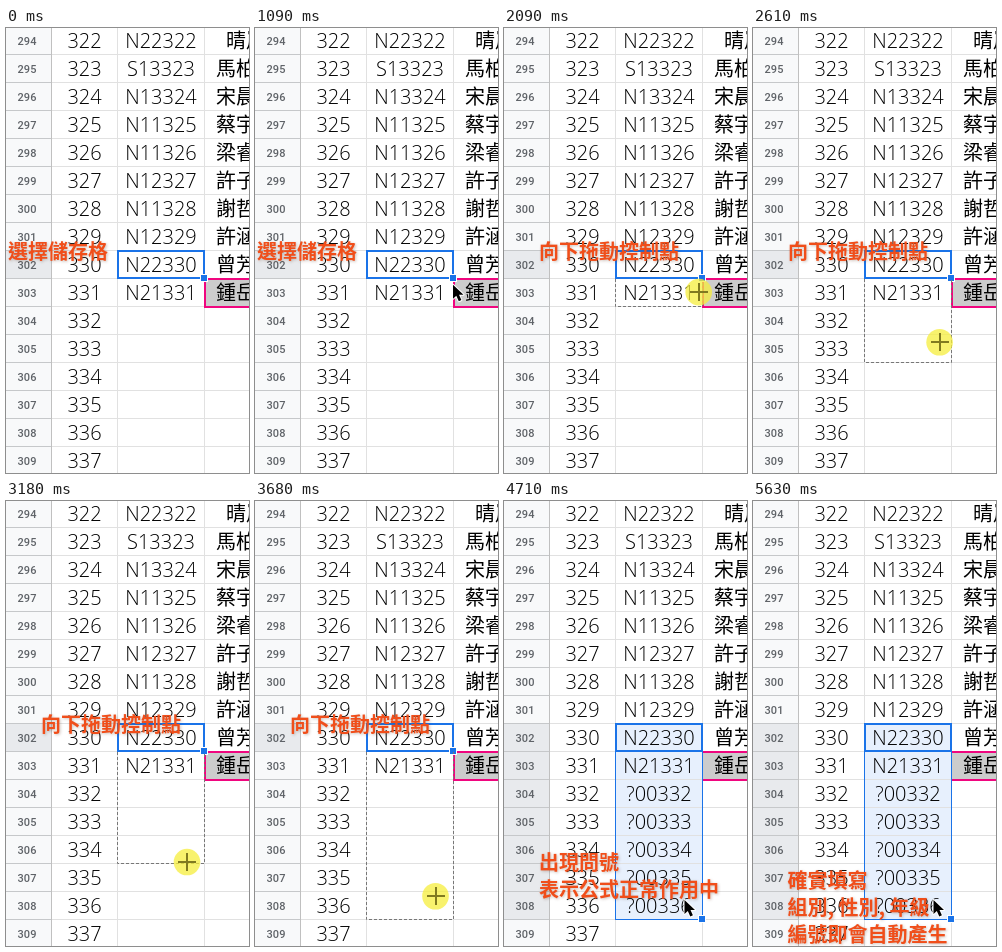
These frames come from a looping animation (243 by 445 pixels, 7.24 s). An HTML page with a canvas:

```html
<!DOCTYPE html>
<html lang="zh-Hant">
<head>
<meta charset="utf-8">
<style>
  html, body { margin: 0; width: 100%; height: 100%; overflow: hidden; background: #fff; }
  canvas { display: block; }
</style>
</head>
<body>
<canvas id="stage" width="243" height="445"></canvas>
<script>
const ctx = document.getElementById('stage').getContext('2d');
const LOOP = 7240, ROW = 28, FIRST_LINE = 26;
const LEFT = 111, RIGHT = 198, ACTIVE = 8, LAST = 14;
const BLUE = '#1a73e8', PINK = '#f0067f', INK = '#000';
const CJK = '"Noto Sans CJK TC", "Noto Sans CJK", sans-serif';
const CELL_FONT = '300 20px "Open Sans", "Noto Sans", sans-serif';
const NAME_FONT = '300 20px ' + CJK;
const LABEL_FONT = 'bold 20px ' + CJK;

const prefixes = ['N22', 'S13', 'N13', 'N11', 'N11', 'N12', 'N11', 'N12', 'N22', 'N21'];
const names = ['晴嵐', '馬柏安', '宋晨安', '蔡宇安', '梁睿安', '許子安', '謝哲安', '許涵安', '曾芳安', '鍾岳安'];

const labels = [
  { from: 0, to: 1210, x: 2, y: 223, lines: ['選擇儲存格'] },
  { from: 1710, to: 4190, x: 35, y: 223, lines: ['向下拖動控制點'] },
  { from: 4710, to: 5630, x: 35, y: 361, lines: ['出現問號', '表示公式正常作用中'] },
  { from: 5630, to: LOOP, x: 34.5, y: 379, lines: ['確實填寫', '組別, 性別, 年級', '編號即會自動產生'] }
];

// Pointer path: time, x, y
const path = [
  [500, 239, 286], [800, 212, 267], [1090, 198, 257], [1210, 198, 251], [1710, 198, 251],
  [2090, 195, 262.5], [2420, 189, 297], [2800, 184, 333], [3180, 181, 361],
  [3680, 180.5, 395], [3890, 180.5, 399]
];
const bursts = [[500, 1210], [1710, 2420], [2470, 3180], [3230, 3890]];

const lineY = row => FIRST_LINE + ROW * row;

function rect(x, y, w, h, color) {
  ctx.fillStyle = color;
  ctx.fillRect(x, y, w, h);
}

function frame(x, y, right, bottom, width, color) {
  rect(x, y, right - x + 1, width, color);
  rect(x, bottom - width + 1, right - x + 1, width, color);
  rect(x, y, width, bottom - y + 1, color);
  rect(right - width + 1, y, width, bottom - y + 1, color);
}

function text(value, x, y, font, color, align = 'center') {
  ctx.font = font;
  ctx.fillStyle = color;
  ctx.textAlign = align;
  ctx.fillText(value, x, y);
}

// The pointer moves at about 15 updates per second.
function pointerAt(time) {
  const burst = bursts.find(([a, b]) => time >= a && time < b);
  const t = burst ? burst[0] + Math.round((time - burst[0]) / 66) * 66 : time;
  let i = 1;
  while (i < path.length - 1 && path[i][0] < t) i++;
  const [t0, x0, y0] = path[i - 1], [t1, x1, y1] = path[i];
  const k = Math.min(1, Math.max(0, (t - t0) / (t1 - t0)));
  return { x: x0 + (x1 - x0) * k, y: y0 + (y1 - y0) * k };
}

function drawSheet(filled, calculated) {
  rect(0, 0, 243, 445, '#fff');
  rect(0, 0, 45, 445, '#f8f9fa');
  const lastSelected = filled ? LAST : ACTIVE;
  rect(0, lineY(ACTIVE - 1) + 1, 45, ROW * (lastSelected - ACTIVE + 1), '#e8eaed');
  if (filled) rect(LEFT, lineY(ACTIVE - 1) + 1, RIGHT - LEFT, lineY(LAST) - lineY(ACTIVE - 1), '#e7f0fd');

  for (let row = 0; row < 16; row++) {
    rect(0, lineY(row), 45, 1, '#c6c8ca');
    rect(46, lineY(row), 197, 1, '#e1e1e1');
  }
  rect(45, 0, 1, 445, '#c0c0c0');
  rect(LEFT, 0, 1, 445, '#e1e1e1');
  rect(RIGHT, 0, 1, 445, '#e1e1e1');

  rect(RIGHT + 1, lineY(ACTIVE), 50, ROW, '#cccccc');
  rect(RIGHT + 1, lineY(ACTIVE), 50, 2, PINK);
  rect(RIGHT + 1, lineY(ACTIVE + 1), 50, 2, PINK);
  if (!filled) rect(RIGHT, lineY(ACTIVE), 2, ROW + 2, PINK);

  for (let row = 0; row < 16; row++) {
    const base = 20 + ROW * row, number = 322 + row;
    text(294 + row, 21, base - 3, '500 11px Roboto, sans-serif', '#5f6368');
    text(number, 78.5, base, CELL_FONT, INK);
    if (row < prefixes.length) {
      text(prefixes[row] + number, 155, base, CELL_FONT, INK);
      text(names[row], 240, base, NAME_FONT, INK);
    } else if (calculated && row <= LAST) {
      text('?00' + number, 155, base, CELL_FONT, INK);
    }
  }
}

function drawSelection(filled) {
  const bottom = lineY(filled ? LAST : ACTIVE);
  if (filled) frame(LEFT, lineY(ACTIVE - 1), RIGHT, bottom, 1, BLUE);
  frame(LEFT, lineY(ACTIVE - 1), RIGHT, lineY(ACTIVE), 2, BLUE);
  rect(RIGHT - 4, bottom - 4, 8, 8, '#fff');
  rect(RIGHT - 3, bottom - 3, 6, 6, BLUE);
}

function drawDragRange(y) {
  const top = lineY(ACTIVE) + 1;
  const rows = Math.ceil((y - top) / ROW);
  if (rows < 1) return;
  const bottom = top - 1 + rows * ROW;
  ctx.strokeStyle = '#777';
  ctx.lineWidth = 1;
  ctx.setLineDash([3, 2]);
  ctx.beginPath();
  ctx.moveTo(LEFT + 0.5, top);
  ctx.lineTo(LEFT + 0.5, bottom + 0.5);
  ctx.lineTo(RIGHT + 0.5, bottom + 0.5);
  ctx.lineTo(RIGHT + 0.5, top);
  ctx.stroke();
  ctx.setLineDash([]);
}

function drawLabel({ x, y, lines }) {
  lines.forEach((line, i) => {
    const base = y + 7.5 + i * 27;
    ctx.save();
    ctx.shadowColor = 'rgba(90,50,30,0.3)';
    ctx.shadowBlur = 3;
    ctx.shadowOffsetX = ctx.shadowOffsetY = 1;
    text(line, x, base, LABEL_FONT, '#f04e1a', 'left');
    ctx.restore();
  });
}

function drawArrow({ x, y }) {
  ctx.save();
  ctx.translate(x, y);
  ctx.beginPath();
  [[0, 0], [0, 14], [3.3, 11], [5.8, 16.5], [8.4, 15.3], [6, 10], [10.5, 10]]
    .forEach(([px, py]) => ctx.lineTo(px, py));
  ctx.closePath();
  ctx.lineJoin = 'round';
  ctx.lineWidth = 2;
  ctx.strokeStyle = '#fff';
  ctx.stroke();
  ctx.fillStyle = '#000';
  ctx.fill();
  ctx.restore();
}

function drawCross({ x, y }, pressed) {
  if (pressed) {
    ctx.fillStyle = 'rgba(245,238,60,0.75)';
    ctx.beginPath();
    ctx.arc(x, y, 13.3, 0, Math.PI * 2);
    ctx.fill();
  }
  const cx = Math.round(x), cy = Math.round(y);
  const color = pressed ? '#807a20' : '#444';
  rect(cx - 9, cy - 1, 18, 2, color);
  rect(cx - 1, cy - 9, 2, 18, color);
}

function render(time) {
  const filled = time >= 4390;
  const pointer = pointerAt(time);
  drawSheet(filled, time >= 4510);
  drawSelection(filled);
  if (time >= 1710 && !filled) drawDragRange(pointer.y);
  labels.filter(l => time >= l.from && time < l.to).forEach(drawLabel);
  if (time >= 1280 && !filled) drawCross(pointer, time >= 1710 && time < 4190);
  else if (time >= 500) drawArrow(pointer);
}

const start = performance.now();
function tick() {
  render((performance.now() - start) % LOOP);
  requestAnimationFrame(tick);
}
tick();
</script>
</body>
</html>
```
